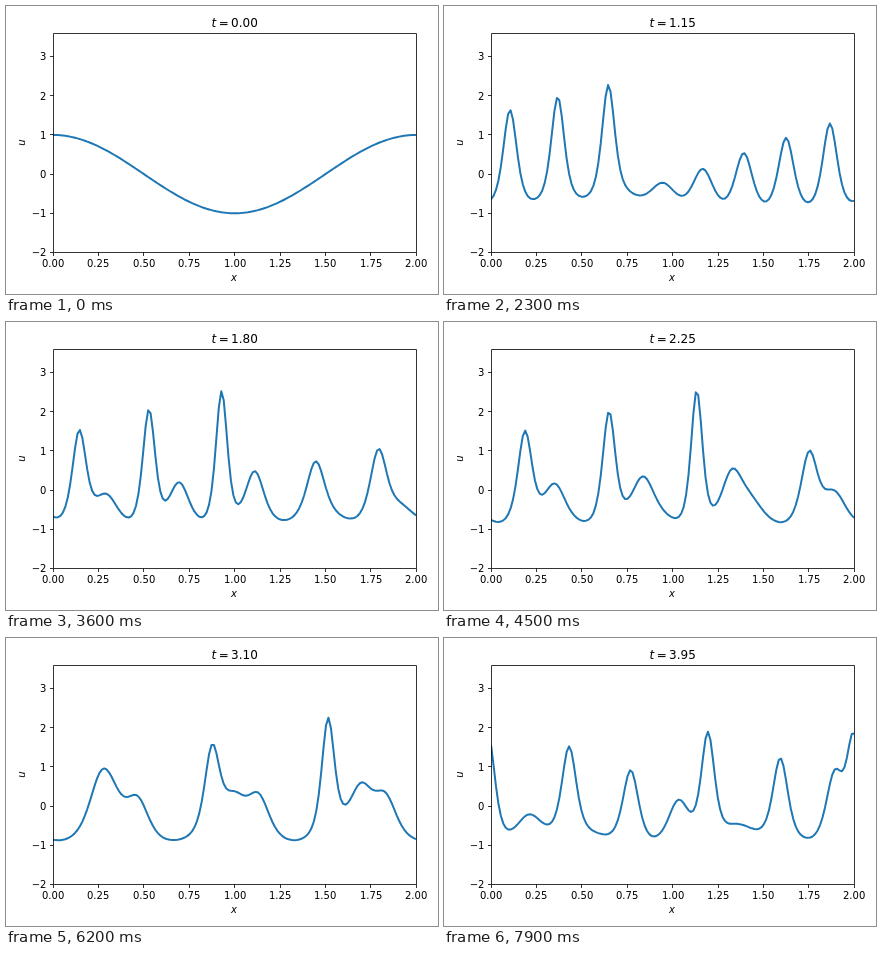
These frames come from a looping animation (432 px wide and 288 px high, 8000 ms). An HTML page:

```html
<!DOCTYPE html>
<html lang="en">
<head>
<meta charset="utf-8">
<title>Nonlinear wave</title>
<style>
  html, body { margin: 0; width: 100%; height: 100%; overflow: hidden; background: #fff; }
  svg { display: block; width: 432px; height: 288px; }
  text { font: 10px "DejaVu Sans", sans-serif; fill: #000; }
  .title { font-size: 12px; }
  .math { font-style: italic; }
  .axis { fill: none; stroke: #000; stroke-width: .8; }
  #wave { fill: none; stroke: #1f77b4; stroke-width: 2; stroke-linejoin: round; }
</style>
</head>
<body>
<svg viewBox="0 0 432 288">
  <clipPath id="frame"><rect x="47" y="27" width="364" height="219"/></clipPath>
  <path id="wave" clip-path="url(#frame)"/>
  <path class="axis" d="M47.5 27.5H410.5V246.5H47.5Z"/>
  <g id="ticks"></g>
  <text class="title" x="205.6" y="21"><tspan class="math">t</tspan><tspan dx="2.34">=</tspan><tspan id="clock" dx="2.34">0.00</tspan></text>
  <text class="math" x="225" y="275">x</text>
  <text class="math" transform="translate(18.5 136.5) rotate(-90)" text-anchor="middle">u</text>
</svg>
<script>
const STEP_MS = 100, COUNT = 80, STEP_T = 0.05;
const POINTS = 150, FINE = 2, N = POINTS * FINE;
const DELTA = 0.022, SUBSTEPS = 200, DT = STEP_T / SUBSTEPS;
const px = x => 47.1 + x * 181.55;
const py = u => 168.1 - u * 39.15;
const byId = id => document.getElementById(id);

// Korteweg-de Vries, u_t = -u u_x - DELTA^2 u_xxx, on a periodic grid:
// sixth-order central differences in space, RK4 in time.
function solve() {
  const dx = 2 / (POINTS - 1) / FINE, pad = 4;
  const d1 = [3 / 4, -3 / 20, 1 / 60, 0].map(c => c / dx);
  const d3 = [-61 / 30, 169 / 120, -3 / 10, 7 / 240].map(c => c * DELTA ** 2 / dx ** 3);
  const w = new Float64Array(N + 2 * pad);

  function rate(u, out) {
    w.set(u, pad);
    for (let i = 0; i < pad; i++) {
      w[i] = u[N - pad + i];
      w[N + pad + i] = u[i];
    }
    for (let i = 0; i < N; i++) {
      let ux = 0, uxxx = 0;
      for (let j = 0; j < pad; j++) {
        const diff = w[i + pad + j + 1] - w[i + pad - j - 1];
        ux += d1[j] * diff;
        uxxx += d3[j] * diff;
      }
      out[i] = -u[i] * ux - uxxx;
    }
  }

  const u = Float64Array.from({ length: N }, (_, i) => Math.cos(Math.PI * Math.min(2, i * dx)));
  const k = new Float64Array(N), sum = new Float64Array(N), trial = new Float64Array(N);
  const weights = [1, 2, 2, 1], reach = [0.5, 0.5, 1, 0];

  function step() {
    sum.fill(0);
    trial.set(u);
    for (let s = 0; s < 4; s++) {
      rate(trial, k);
      for (let i = 0; i < N; i++) {
        sum[i] += weights[s] * k[i];
        trial[i] = u[i] + reach[s] * DT * k[i];
      }
    }
    for (let i = 0; i < N; i++) u[i] += DT / 6 * sum[i];
  }

  return Array.from({ length: COUNT }, (_, n) => {
    for (let s = 0; n > 0 && s < SUBSTEPS; s++) step();
    return u.filter((_, i) => i % FINE === 0);
  });
}

function drawTicks() {
  let out = "";
  for (let i = 0; i <= 8; i++) {
    const x = px(i / 4), s = Math.floor(x) + 0.5;
    out += `<path class="axis" d="M${s} 246.5v3.5"/>
      <text x="${Math.round(x - 11.1)}" y="261">${(i / 4).toFixed(2)}</text>`;
  }
  for (let u = -2; u <= 3; u++) {
    const y = py(u), s = Math.floor(y) + 0.5;
    out += `<path class="axis" d="M47.5 ${s}h-3.5"/>
      <text x="40.4" y="${Math.round(y + 3.8)}" text-anchor="end">${String(u).replace("-", "\u2212")}</text>`;
  }
  byId("ticks").innerHTML = out;
}

drawTicks();
const paths = solve().map(u => "M" + Array.from(u, (v, i) =>
  px(2 * i / (POINTS - 1)).toFixed(2) + " " + py(v).toFixed(2)).join("L"));

function render(ms) {
  const k = Math.floor(ms / STEP_MS) % COUNT;
  byId("wave").setAttribute("d", paths[k]);
  byId("clock").textContent = (k * STEP_T).toFixed(2);
}

const start = performance.now();
function loop() {
  render(performance.now() - start);
  requestAnimationFrame(loop);
}
render(0);
requestAnimationFrame(loop);
</script>
</body>
</html>
```
